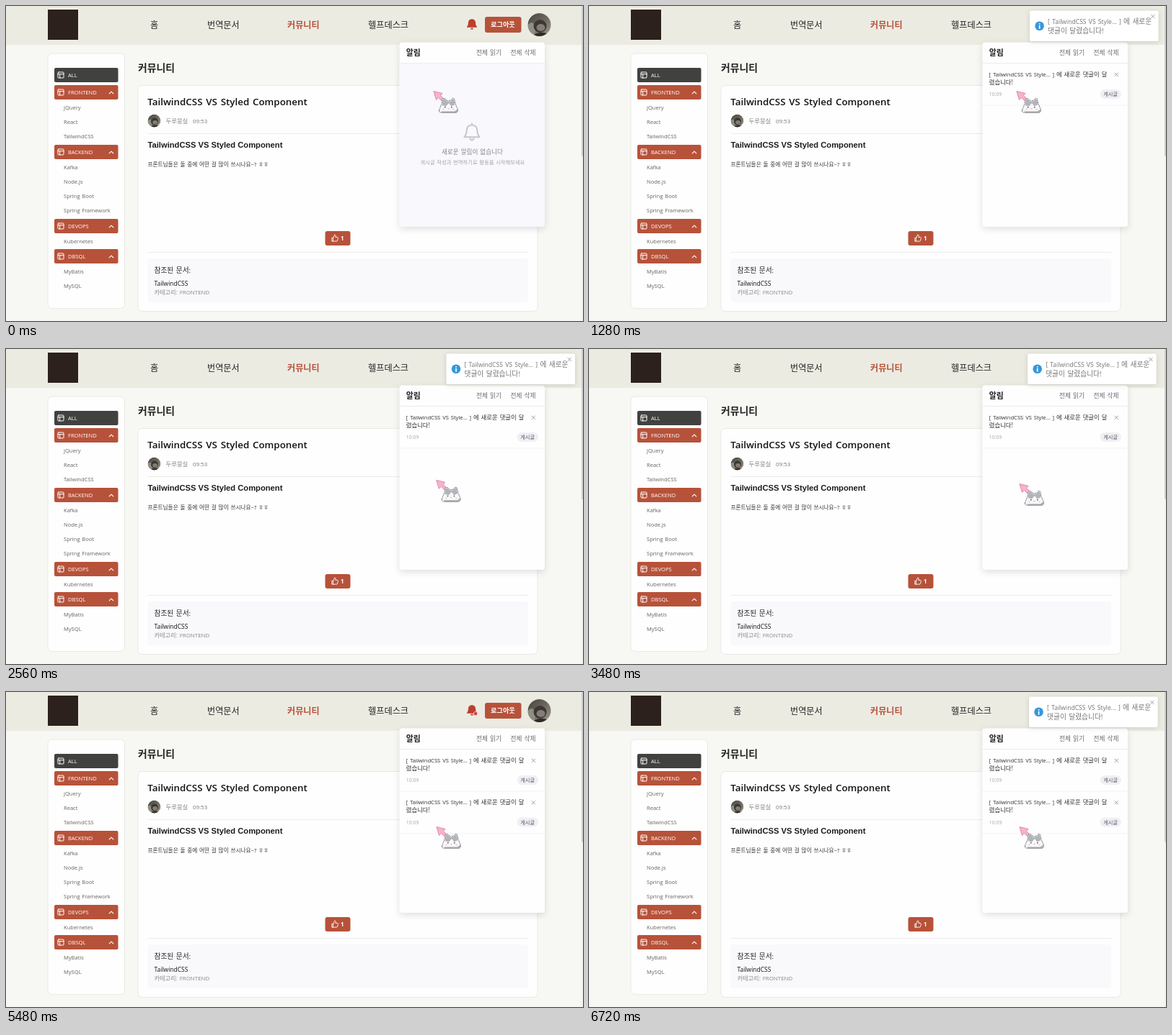
An HTML page for the animation above (8 s loop, 800 px wide and 438 px high).

```html
<!DOCTYPE html>
<html lang="ko">
<head>
<meta charset="utf-8">
<title>커뮤니티</title>
<style>
html, body { margin: 0; width: 100%; height: 100%; overflow: hidden; background: #f7f7f3; }
svg { display: block; width: 100%; height: 100%; }
text { font-family: "Open Sans", "Noto Sans CJK KR", "Noto Sans CJK", sans-serif; white-space: pre; word-spacing: .1em; }
.arial { font-family: "Liberation Sans", Arial, sans-serif; word-spacing: 0; }
.line { fill: none; stroke-linecap: round; stroke-linejoin: round; }
.panel { filter: drop-shadow(0 3px 5px rgba(0,0,0,.12)); }
.toast { filter: drop-shadow(0 1px 3px rgba(0,0,0,.14)); }
</style>
</head>
<body>
<svg id="stage" viewBox="0 0 800 438" preserveAspectRatio="none">
  <defs>
    <linearGradient id="fur" x1="0" y1="0" x2="1" y2="1">
      <stop offset="0" stop-color="#45443c"/><stop offset=".5" stop-color="#6b675e"/><stop offset="1" stop-color="#a39d90"/>
    </linearGradient>
    <clipPath id="round"><circle r="16"/></clipPath>
    <g id="avatar">
      <g clip-path="url(#round)">
        <circle r="16" fill="url(#fur)"/>
        <ellipse cx="-11" cy="6" rx="6" ry="9" fill="#8f8e82"/>
        <ellipse cx="1" cy="2" rx="9" ry="9" fill="#3b3734"/>
        <ellipse cx="2" cy="4" rx="6" ry="5" fill="#857d75"/>
        <ellipse cx="3" cy="16" rx="11" ry="5" fill="#2d2b29"/>
      </g>
    </g>
    <g id="grid" class="line" stroke="#fff" stroke-width="1">
      <rect x="-4" y="-4" width="8" height="8" rx="1"/><path d="M-4-1.3H4M-1.3-1.3V4"/>
    </g>
    <path id="up" class="line" d="M-2.8 1.4L0-1.4 2.8 1.4" stroke="#fff" stroke-width="1.1"/>
    <path id="cross" class="line" d="M-2.3-2.3L2.3 2.3M2.3-2.3L-2.3 2.3" stroke="#8b8b92" stroke-width=".8"/>
    <g id="cat">
      <path d="M600.500 145L604 136 605.500 128.500 609 129 612 132 616 131.500 619.500 128 621.500 129 623 136 626.500 144Q627 148.500 622 148.500H605Q600 148.500 600.500 145Z" fill="#f8f8f9" stroke="#77787d" stroke-width="1" stroke-dasharray="2 .7"/>
      <path d="M606 129.500L609 130 612 133 616 132.500 619.500 129 621 130 622.500 137 617.500 139.500 614 135 610 139.500 604.500 138Z" fill="#b2b4b9"/>
      <path d="M603 146.500H622L626 143.500 626.500 146 622 149H605Z" fill="#a4a5aa"/>
      <path d="M608 140h1.500v1.500h-1.500zM617 140h1.500v1.500h-1.500z" fill="#4a4b50"/>
      <path d="M612.500 142h2v1.200h-2zM605.500 143h2v1h-2zM619.500 143h2v1h-2z" fill="#eea9bd"/>
    </g>
  </defs>

  <rect width="800" height="438" fill="#f7f7f3"/>
  <rect width="800" height="54" fill="#ecebe2"/>
  <rect x="58" y="5" width="42" height="42" fill="#2c211c"/>
  <g id="page"></g>

  <path d="M646 18.300c-3.500 0-5.100 2.500-5.100 5.300 0 3.200-1.200 4.200-1.900 5.400v.8h14v-.8c-.7-1.200-1.900-2.200-1.900-5.400 0-2.800-1.600-5.300-5.100-5.300zM644 30.700a2 2 0 0 0 4 0z" fill="#bb3f2e"/>
  <circle id="dot" cx="651" cy="30" r="2.700" fill="#e0393b" stroke="#ecebe2" stroke-width=".7"/>
  <circle cx="739.500" cy="26" r="16.500" fill="#d9d7cd"/>
  <use href="#avatar" x="739.500" y="26"/>
  <use href="#avatar" transform="translate(205.500 159.500) scale(.56)"/>

  <rect x="798" width="2" height="438" fill="#f1f1ef"/>
  <rect x="798" width="2" height="209" rx="1" fill="#cdcdcb"/>

  <g>
    <rect class="panel" x="545.500" y="50.500" width="201.500" height="256.500" rx="4" fill="#fefefe"/>
    <g id="panelHead"></g>
    <g id="empty">
      <path d="M545.500 80H747V303a4 4 0 0 1-4 4H549.500a4 4 0 0 1-4-4Z" fill="#f9f8fc"/>
      <path class="line" d="M646 165.500c-4.900 0-7.300 3.500-7.300 7.700 0 5.300-2 7-3.200 9.100h21c-1.200-2.100-3.200-3.800-3.200-9.100 0-4.200-2.400-7.700-7.300-7.700zM646 163.500v2M643.500 184.500a2.600 2.600 0 0 0 5 0" stroke="#c6c6cc" stroke-width="2"/>
    </g>
    <g id="row0"></g>
    <g id="row1" transform="translate(0 58.500)"></g>
  </g>

  <g id="toast">
    <rect class="toast" x="610.500" y="6.500" width="178.500" height="42.500" rx="2" fill="#fff"/>
    <circle cx="624" cy="27.800" r="6.300" fill="#3498db"/>
    <path d="M623.200 24h1.700v1.600h-1.700zM623.200 26.700h1.700v5h-1.700z" fill="#fff"/>
    <use href="#cross" x="781.200" y="14.500"/>
  </g>

  <g id="cursor">
    <g id="arrow">
      <path d="M593 118.500L605 121.500 602.500 124.500 607 129 604 132 599.500 127.500 596.500 130.500Z" fill="#f6b3cb" stroke="#e389aa" stroke-width="1"/>
      <use href="#cat"/>
    </g>
    <g id="paw" transform="translate(-2 1.500)">
      <circle cx="599.500" cy="125" r="7" fill="#fdebf1" stroke="#e38fac" stroke-width="1.200"/>
      <g fill="#ec91b0">
        <ellipse cx="599.500" cy="127.500" rx="3.200" ry="2.500"/>
        <circle cx="595.400" cy="124.200" r="1.200"/><circle cx="598" cy="121.600" r="1.300"/>
        <circle cx="601.200" cy="121.600" r="1.300"/><circle cx="603.700" cy="124.200" r="1.200"/>
      </g>
      <use href="#cat"/>
    </g>
  </g>
</svg>
<script>
const $ = id => document.getElementById(id);
const BRICK = '#b7523a';

// Markup helpers
const text = (x, y, size, str, fill = '#222', weight = 400, cls = '') =>
  `<text x="${x}" y="${y}" font-size="${size}" fill="${fill}" font-weight="${weight}" class="${cls}">${str}</text>`;
const box = (x, y, w, h, r, fill, stroke = 'none') =>
  `<rect x="${x}" y="${y}" width="${w}" height="${h}" rx="${r}" fill="${fill}" stroke="${stroke}"/>`;
const rule = (x, y, w, fill = '#ebebed') => box(x, y, w, 1, 0, fill);
const icon = (id, x, y) => `<use href="#${id}" x="${x}" y="${y}"/>`;
const add = (id, ...parts) => $(id).insertAdjacentHTML('beforeend', parts.join(''));
const small = (str, size) => `<tspan font-size="${size}">${str}</tspan>`;

const title = 'TailwindCSS VS Styled Component';
const shortTitle = '[ TailwindCSS VS Style... ] ';

// Header
add('page',
  text(200, 30.7, 12.2, '홈'),
  text(279, 30.7, 12.1, '번역문서'),
  text(390, 30.7, 12.1, '커뮤니티', BRICK, 700),
  text(502, 30.7, 12.2, '헬프데스크'),
  box(664, 15, 50.5, 22, 3, BRICK),
  text(672, 29.2, 9.2, '로그아웃', '#fff', 700));

// Sidebar
const menu = [
  [86, 'ALL'],
  [110, 'FRONTEND', 'jQuery', 'React', 'TailwindCSS'],
  [193, 'BACKEND', 'Kafka', 'Node.js', 'Spring Boot', 'Spring Framework'],
  [296, 'DEVOPS', 'Kubernetes'],
  [338, 'DBSQL', 'MyBatis', 'MySQL']
];
add('page', box(58, 66, 106.5, 354.5, 6, '#fefefe', '#e9e9e5'));
menu.forEach(([y, name, ...items], i) => {
  add('page',
    box(67, y, 88.5, 20, 2, i ? BRICK : '#41413f'),
    icon('grid', 76, y + 10),
    text(86, y + 13, 7.55, name, '#fff'),
    i ? icon('up', 146, y + 10.5) : '');
  items.forEach((item, k) => add('page', text(80, y + 33.7 + k * 20, 7.55, item, '#66645f')));
});

// Post
add('page',
  text(183, 90.8, 13.85, '커뮤니티', '#222', 700),
  box(183, 110.5, 554, 314, 6, '#fefefe', '#e9e9e5'),
  text(196.3, 138, 13.35, title, '#111', 600),
  text(221.5, 162.8, 8.4, '두루뭉실', '#85858a'),
  text(259, 162.5, 7.9, '09:53', '#77777c'),
  rule(196.5, 177, 527.5),
  text(196.5, 196.8, 11.2, title, '#1c1c1c', 700, 'arial'),
  text(196.5, 223, 7.65, '프론트님들은 둘 중에 어떤 걸 많이 쓰시나요~? ㅎㅎ', '#333'),
  box(442.5, 313, 35, 20, 3, BRICK),
  '<path class="line" d="M453.700 322.300l2-4.200c1.300 0 1.700.8 1.500 1.700l-.4 1.700h2.600c.8 0 1.200.6 1 1.300l-.9 3.400c-.2.600-.5.9-1.100.9h-4.700zM453.700 322.300h-1.900v4.800h1.900" stroke="#fff" stroke-width=".9"/>',
  text(464, 326.3, 7.9, '1', '#fff', 700),
  rule(196.5, 342, 527.5),
  box(196.5, 351, 527.5, 61, 4, '#f9f8fb'),
  text(205.5, 370.5, 9.7, '참조된 문서:', '#222', 500),
  text(205.5, 388.5, 8.5, 'TailwindCSS', '#111'),
  text(205.5, 400.5, 8.2, '카테고리: ' + small('FRONTEND', 7.9), '#88888c'));

// Notification panel
add('panelHead',
  text(554.8, 68.9, 10.9, '알림', '#1e1e22', 700),
  text(652, 68.2, 8.7, '전체 읽기', '#6c6c72'),
  text(699.5, 68.2, 8.7, '전체 삭제', '#6c6c72'),
  rule(545.5, 79, 201.5, '#ececf0'));
add('empty',
  text(604, 206.3, 8.55, '새로운 알림이 없습니다', '#84848b'),
  text(574.5, 220.3, 7.3, '게시글 작성과 번역하기로 활동을 시작해보세요', '#a4a4ab'));
['row0', 'row1'].forEach(id => add(id,
  text(554.8, 97.7, 8.35, small(shortTitle, 7.65) + '에 새로운 댓글이 달', '#303034'),
  text(554.8, 108.5, 8.35, '렸습니다!', '#303034'),
  icon('cross', 731.3, 95.3),
  text(554.8, 125, 6.9, '10:09', '#a6a6ad'),
  box(708.5, 116, 29.5, 13, 6.5, '#f0eff4'),
  text(713.2, 125.1, 7.2, '게시글', '#55555c'),
  rule(545.5, 137.5, 201.5, '#f3f3f6')));

add('toast',
  text(635.5, 24.6, 9.7, small(shortTitle, 8.6) + '에 새로운', '#757575'),
  text(635.5, 37.8, 9.7, '댓글이 달렸습니다!', '#757575'));

// Motion
const LOOP = 8000, STEP = 40, SLIDE = 700, ZOOM = 800 / 1920;

function bezier(x1, y1, x2, y2) {
  const at = (a, b, s) => 3 * a * s * (1 - s) ** 2 + 3 * b * s * s * (1 - s) + s ** 3;
  return x => {
    let lo = 0, hi = 1;
    for (let i = 0; i < 24; i++) {
      const mid = (lo + hi) / 2;
      if (at(x1, x2, mid) < x) lo = mid; else hi = mid;
    }
    return at(y1, y2, lo);
  };
}

const glide = { ease: bezier(.215, .61, .355, 1),
  keys: [[0, 3000, 0], [.6, -25, 1], [.75, 10, 1], [.9, -5, 1], [1, 0, 1]] };
const leave = { ease: bezier(.25, .1, .25, 1),
  keys: [[0, 0, 1], [.2, -20, 1], [1, 2000, 0]] };
const inOut = bezier(.4, 0, .35, 1);

// Returns [x, opacity] for a progress of 0..1
function pose({ ease, keys }, p) {
  if (p >= 1) return keys[keys.length - 1].slice(1);
  const i = keys.findIndex(k => k[0] > p);
  const [p0, x0, o0] = keys[i - 1], [p1, x1, o1] = keys[i];
  const e = ease((p - p0) / (p1 - p0));
  return [x0 + (x1 - x0) * e, o0 + (o1 - o0) * e];
}

// The slide stalls briefly on its way in
const enterTime = t => t < 200 ? Math.min(195 + t, 230) : t + 98;

const toasts = [{ from: 920, to: 3453 }, { from: 6160, to: LOOP }];

function show(id, on) { $(id).style.display = on ? '' : 'none'; }

function drawToast(t) {
  const cur = toasts.find(a => t >= a.from && t < a.to + SLIDE);
  show('toast', cur);
  if (!cur) return;
  const [x, o] = t < cur.to
    ? pose(glide, enterTime(t - cur.from) / SLIDE)
    : pose(leave, (t - cur.to) / SLIDE);
  $('toast').setAttribute('transform', `translate(${x * ZOOM} 0)`);
  $('toast').setAttribute('opacity', o);
}

function drawCursor(t) {
  const e = inOut(Math.min(1, Math.max(0, (t - 2240) / 440)));
  const y = 69 * e, onRow = t >= 2240 && y < 20;
  $('cursor').setAttribute('transform', `translate(${4 * e} ${y})`);
  show('paw', onRow);
  show('arrow', !onRow);
}

function draw(t) {
  show('empty', t < 320);
  show('dot', t >= 320);
  show('row0', t >= 320);
  show('row1', t >= 5480);
  drawToast(t);
  drawCursor(t);
}

const start = performance.now();
function tick() {
  const t = Math.max(0, performance.now() - start) % LOOP;
  draw(Math.floor(t / STEP) * STEP);
  requestAnimationFrame(tick);
}
tick();
</script>
</body>
</html>
```
